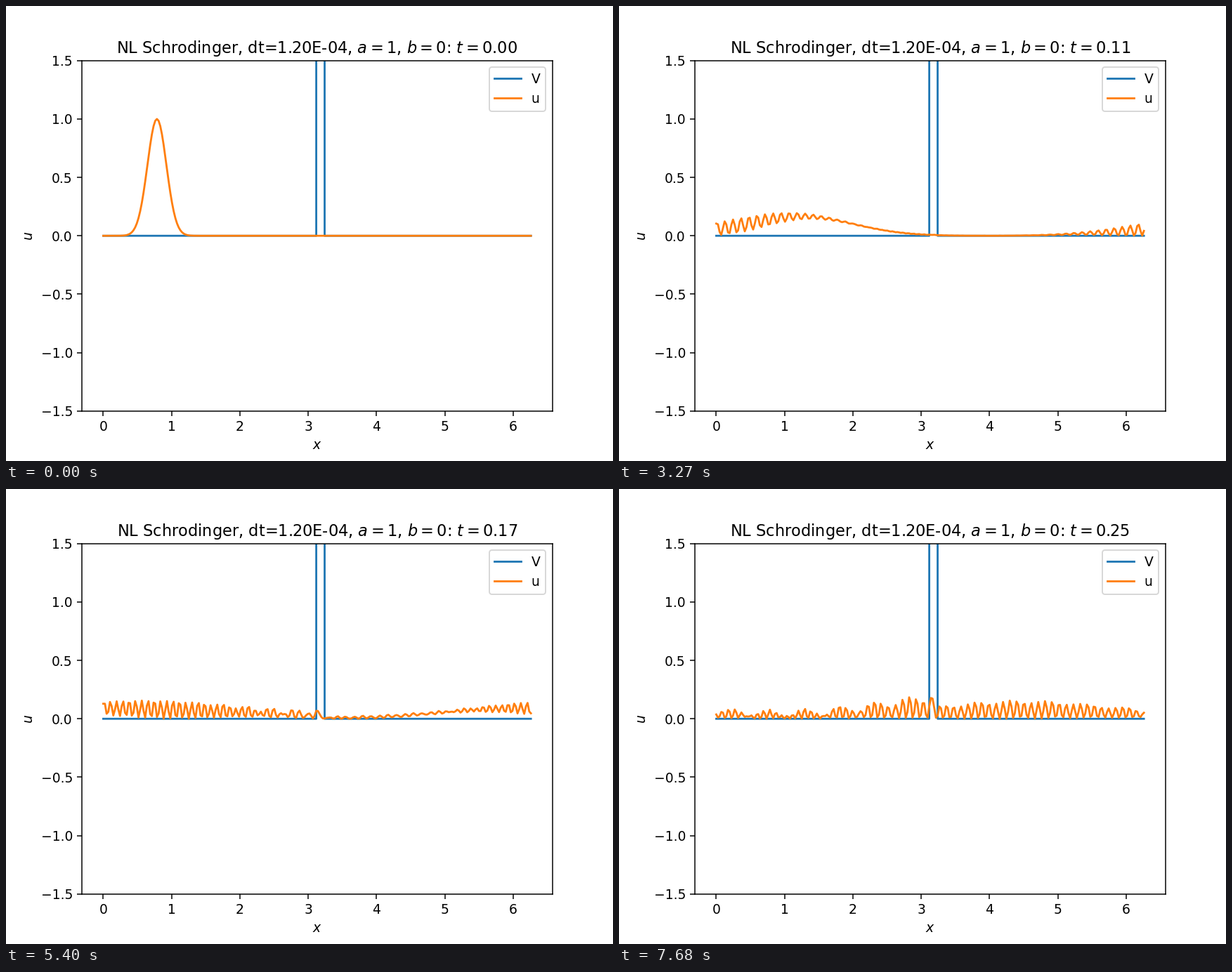
Write a matplotlib script that moves like this. It is 864 px wide and 648 px high and loops after 7710 ms.

```python
import numpy as np
import matplotlib.pyplot as plt
from matplotlib.animation import FuncAnimation

plt.rcParams["font.family"] = "DejaVu Sans"

N = 256
FRAMES = 257
INTERVAL = 30
STEPS_PER_FRAME = 8
A, B = 1, 0

# Periodic grid on [0, 2*pi)
dx = 2 * np.pi / N
x = dx * np.arange(N)
k = np.fft.fftfreq(N, 1 / N)
dt = 0.2 * dx**2

# Square barrier just right of the centre
V = np.zeros(N)
V[N // 2:N // 2 + 4] = 500

# Gaussian packet moving to the right
x0, sigma, k0 = np.pi / 4, np.pi / 16, 32
psi0 = np.exp(-(x - x0)**2 / (2 * sigma**2) + 1j * k0 * (x - x0))

# i u_t = -a u_xx + V u, solved exactly through the spectral Hamiltonian
kinetic = np.fft.ifft(A * k[:, None]**2 * np.fft.fft(np.eye(N), axis=0), axis=0).real
energy, modes = np.linalg.eigh((kinetic + kinetic.T) / 2 + np.diag(V))
coeffs = modes.T @ psi0


def density(t):
    return np.abs(modes @ (np.exp(-1j * energy * t) * coeffs))**2


def title_text(t):
    return f"NL Schrodinger, dt={dt:.2E}, $a={A}$, $b={B}$: $t={t:.2f}$"


fig, ax = plt.subplots(figsize=(6.4, 4.8), dpi=135)
ax.plot(x, V, color="C0", label="V")
wave, = ax.plot(x, density(0), color="C1", label="u")
ax.set_ylim(-1.5, 1.5)
ax.set_xlabel("$x$")
ax.set_ylabel("$u$")
ax.legend(loc="upper right")
title = ax.set_title(title_text(0))


def update(n):
    t = n * STEPS_PER_FRAME * dt
    wave.set_ydata(density(t))
    title.set_text(title_text(t))
    return wave, title


anim = FuncAnimation(fig, update, frames=FRAMES, interval=INTERVAL, repeat=True)
plt.show()
```
